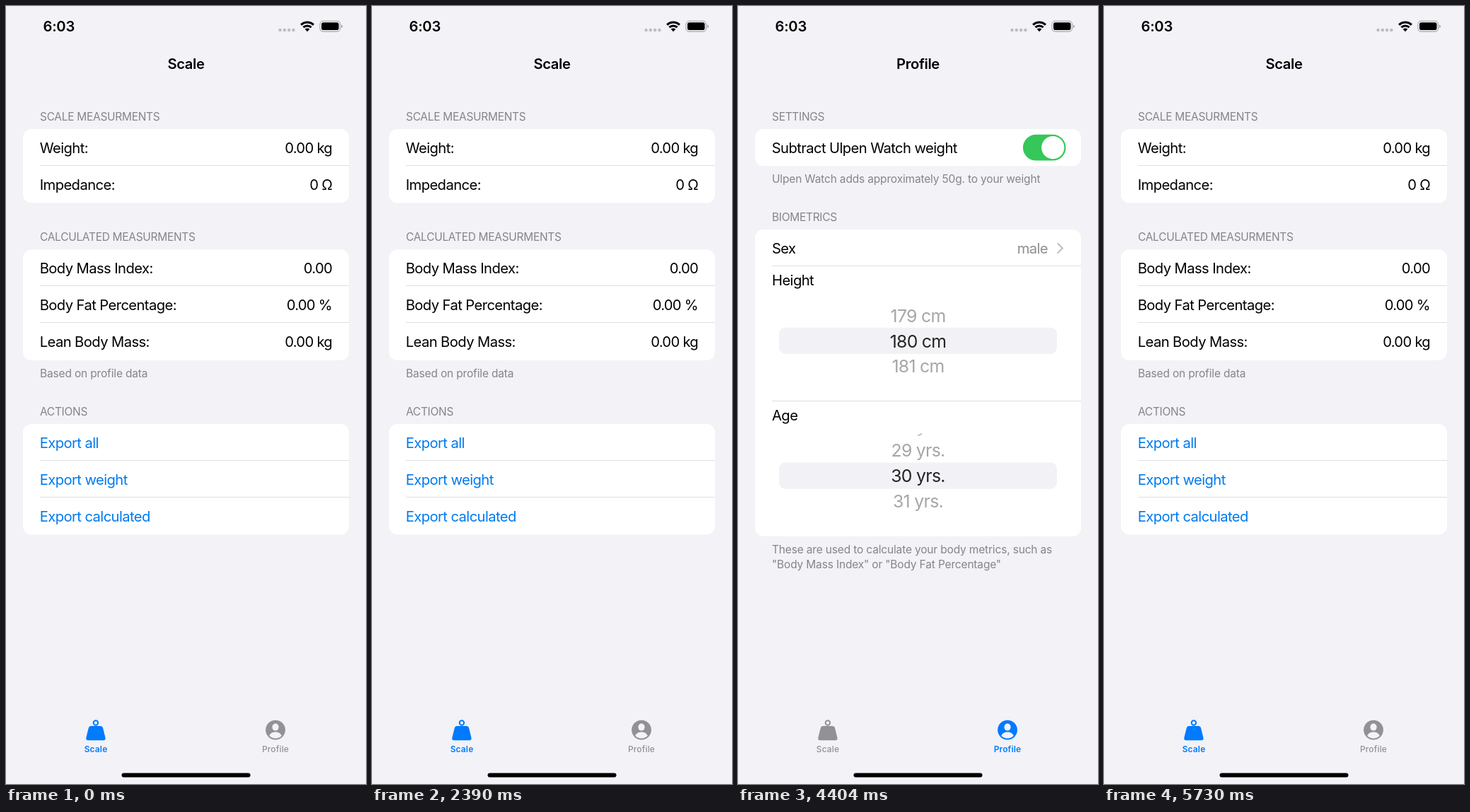
Animation, 509 px wide and 1100 px high, one loop 5920 ms. Source, as an HTML page:

```html
<!DOCTYPE html>
<html lang="en">
<head>
<meta charset="utf-8">
<title>Scale and profile</title>
<style>
  html, body { margin: 0; width: 100%; height: 100%; overflow: hidden; background: #f2f2f7; }
  svg { display: block; width: 509px; height: 1100px; }
  text { font: 400 20.2px Inter, sans-serif; font-optical-sizing: none; letter-spacing: -.58px; white-space: pre; }
  .title { font-weight: 600; letter-spacing: -.35px; text-anchor: middle; }
  .time { font-weight: 600; letter-spacing: -.25px; }
  .note, .heading { font-size: 15.46px; letter-spacing: -.14px; fill: #858589; }
  .heading { letter-spacing: -.27px; }
  .value { letter-spacing: -.7px; text-anchor: end; }
  .muted { text-anchor: end; fill: #8e8e93; }
  .link { fill: #007aee; }
  .pick { font-size: 24.8px; letter-spacing: -.7px; text-anchor: middle; fill: #252525; }
  .faded { fill: #a6a6a6; }
  .tab { color: #929296; fill: currentColor; }
  .tab text { font-size: 11.9px; font-weight: 500; letter-spacing: .2px; text-anchor: middle; }
  .tab.active { color: #007aff; }
  .tab.active text { font-weight: 600; }
</style>
</head>
<body>
<svg id="stage" viewBox="0 0 509 1100">
  <rect width="509" height="1100" fill="#f2f2f7"/>
  <g id="screen"></g>

  <text class="time" x="52.5" y="36.3">6:03</text>
  <g fill="#bcbcc1">
    <circle cx="387.5" cy="34" r="2.2"/><circle cx="393.8" cy="34" r="2.2"/>
    <circle cx="400.1" cy="34" r="2.2"/><circle cx="406.4" cy="34" r="2.2"/>
  </g>
  <g fill="none" stroke="#000" stroke-width="3">
    <path d="M417.1 26.6a13 13 0 0 1 17.8 0M420.4 30.2a8.2 8.2 0 0 1 11.2 0"/>
    <path d="M426 36.2l-3.3-3.4a4.7 4.7 0 0 1 6.6 0z" fill="#000" stroke="none"/>
  </g>
  <rect x="444" y="21.3" width="28.5" height="14.8" rx="4.5" fill="none" stroke="#a4a4a8" stroke-width="1.1"/>
  <rect x="446" y="23.3" width="24.5" height="10.8" rx="2.8"/>
  <path d="M474 26.2q2 1 2 2.5t-2 2.5z" fill="#a4a4a8"/>

  <g class="tab" id="scaleTab">
    <circle cx="126.9" cy="1013.5" r="3.2" fill="none" stroke="currentColor" stroke-width="2"/>
    <path d="M120.4 1018h13q3 0 3.7 2.9l3.3 13.3q1 4-3 4h-21q-4 0-3-4l3.3-13.3q.7-2.9 3.7-2.9z"/>
    <text x="127" y="1054.8">Scale</text>
  </g>
  <g class="tab" id="profileTab">
    <circle cx="381" cy="1023.6" r="13.9"/>
    <g fill="#f2f2f7">
      <ellipse cx="381" cy="1019.6" rx="4.6" ry="5"/>
      <path d="M372.3 1031.8c1.3-3.6 4.8-5.3 8.7-5.3s7.4 1.7 8.7 5.3a12 12 0 0 1-17.4 0z"/>
    </g>
    <text x="381" y="1054.8">Profile</text>
  </g>
  <rect x="163.5" y="1084.5" width="182" height="6" rx="3"/>
</svg>

<script>
const LOOP = 5920, PROFILE_IN = 2700, PROFILE_OUT = 5730;
const ROW = 52.2, LEFT = 48, RIGHT = 461, MIDDLE = 254.5;

const text = (x, y, content, kind = "") => `<text class="${kind}" x="${x}" y="${y}">${content}</text>`;
const note = (y, content) => text(LEFT, y, content, "note");
const heading = (y, content) => text(LEFT, y, content, "heading");
const line = y => `<path d="M${LEFT} ${y}H485" stroke="#dfdfe2"/>`;
const card = (y, height) => `<rect x="24" y="${y}" width="461" height="${height}" rx="12" fill="#fff"/>`;

function list(top, rows, kind) {
  return card(top, ROW * rows.length) + rows.map(([label, value], i) => {
    const y = top + ROW * i;
    return (i ? line(Math.floor(y) - .5) : "") +
      text(LEFT - .3, y + 33.6, label, kind) +
      (value ? text(RIGHT, y + 33.6, value, "value") : "");
  }).join("");
}

function picker(top, [before, current, after]) {
  return `<rect x="58" y="${top}" width="393" height="37.3" rx="9" fill="#f2f2f6"/>` +
    text(MIDDLE, top - 8.2, before, "pick faded") +
    text(MIDDLE, top + 27.8, current, "pick") +
    text(MIDDLE, top + 63, after, "pick faded");
}

const scaleScreen =
  text(MIDDLE, 89.4, "Scale", "title") +
  heading(162, "SCALE MEASURMENTS") +
  list(174, [["Weight:", "0.00 kg"], ["Impedance:", "0 Ω"]]) +
  heading(332.4, "CALCULATED MEASURMENTS") +
  list(344.3, [["Body Mass Index:", "0.00"], ["Body Fat Percentage:", "0.00 %"], ["Lean Body Mass:", "0.00 kg"]]) +
  note(525, "Based on profile data") +
  heading(579.3, "ACTIONS") +
  list(591, [["Export all"], ["Export weight"], ["Export calculated"]], "link");

const profileScreen =
  text(MIDDLE, 89.4, "Profile", "title") +
  heading(162, "SETTINGS") +
  list(174, [["Subtract Ulpen Watch weight"]]) +
  `<rect x="402.9" y="181.8" width="60.6" height="36.8" rx="18.4" fill="#35c759"/>
   <circle cx="445.2" cy="200.2" r="16.1" fill="#fff"/>` +
  note(250.2, "Ulpen Watch adds approximately 50g. to your weight") +
  heading(304.2, "BIOMETRICS") +
  card(316, 433.8) +
  text(LEFT, 350.2, "Sex") +
  text(438, 350.2, "male", "muted") +
  `<path d="M452.2 335.8l6.6 6.6-6.6 6.6" fill="none" stroke="#bfbfc3" stroke-width="2.1" stroke-linecap="round"/>` +
  line(367.5) +
  text(LEFT, 395.2, "Height") +
  picker(454.7, ["179 cm", "180 cm", "181 cm"]) +
  line(558.5) +
  text(LEFT, 586.2, "Age") +
  `<path d="M254 606.9q3.5.3 5.6-2.4" fill="none" stroke="#a6a6a6" stroke-width="1.3"/>` +
  picker(645.5, ["29 yrs.", "30 yrs.", "31 yrs."]) +
  note(774.2, "These are used to calculate your body metrics, such as") +
  note(795.3, '"Body Mass Index" or "Body Fat Percentage"');

const screen = document.getElementById("screen");
const scaleTab = document.getElementById("scaleTab");
const profileTab = document.getElementById("profileTab");
let shown;

function draw() {
  const t = performance.now() % LOOP;
  const onProfile = t >= PROFILE_IN && t < PROFILE_OUT;
  if (onProfile !== shown) {
    shown = onProfile;
    screen.innerHTML = onProfile ? profileScreen : scaleScreen;
    scaleTab.classList.toggle("active", !onProfile);
    profileTab.classList.toggle("active", onProfile);
  }
  requestAnimationFrame(draw);
}
draw();
</script>
</body>
</html>
```
